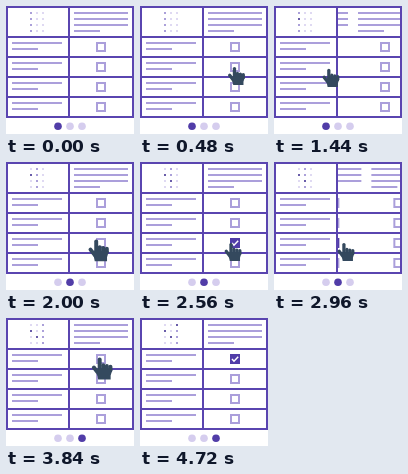
An HTML page with a canvas for the animation above (5.2 s loop, 128 by 128 pixels).

```html
<!DOCTYPE html>
<html lang="en">
<head>
<meta charset="utf-8">
<title>Swipe survey</title>
<style>
html, body { margin: 0; width: 100%; height: 100%; overflow: hidden; background: #fff; }
canvas { display: block; width: 128px; height: 128px; }
</style>
</head>
<body>
<canvas id="stage"></canvas>
<script>
const LOOP = 5200, STEP = 80, PITCH = 64;
const TRAVEL = 400, PRESS = 80, TICK = 160, HOLD = 200, SWIPE = 440;
const BORDER = '#5a45b0', ACTIVE = '#513da8', MEDIUM = '#8f80cc', LIGHT = '#ab9fdb';
const PALE = '#d5cdee', CHOSEN = '#38278c', SLATE = '#34495e';
const canvas = document.getElementById('stage');
const ctx = canvas.getContext('2d');
const ratio = window.devicePixelRatio || 1;
canvas.width = canvas.height = 128 * ratio;

const clamp = v => Math.min(1, Math.max(0, v));
const linear = p => p;
const easeIn = p => p * p;
const easeOut = p => 1 - (1 - p) * (1 - p);
const smooth = p => p * p * (3 - 2 * p);

// One visit per page: the hand ticks a row, then swipes the page (or leaves) to x, y.
const visits = [
  { row: 1, arrive: 400, swipe: 1220, x: 54, y: 72, ease: easeIn },
  { row: 2, arrive: 2120, swipe: 2818, x: 63, y: 90, ease: easeIn },
  { row: 0, arrive: 3880, leave: 4720, x: 141, y: 60, ease: smooth }
];
const swipes = visits.filter(v => v.swipe).map(v => v.swipe);

// Hand poses are [centre x, centre y, scale]; a pressed hand is smaller.
const ENTRY = [148, 122, 1], PRESSED = .82;
const moves = visits.flatMap(({ row, arrive, swipe, leave, x, y, ease }) => {
  const spot = [96.5, 50 + 20 * row];
  return [
    { start: arrive - TRAVEL, end: arrive, to: [...spot, 1], ease: easeOut },
    { start: arrive, end: arrive + PRESS, to: [...spot, PRESSED], ease: linear },
    { start: arrive + HOLD, end: leave || swipe + 250, to: [x, y, leave ? 1 : PRESSED], ease }
  ];
});

const progress = (t, start, end) => clamp((t - start) / (end - start));
const ticked = (page, row, t) => visits[page].row === row && t >= visits[page].arrive + TICK;

function rect(x, y, w, h, color) {
  ctx.fillStyle = color;
  ctx.fillRect(x, y, w, h);
}

function disc(x, y, r, color) {
  ctx.fillStyle = color;
  ctx.beginPath();
  ctx.arc(x, y, r, 0, Math.PI * 2);
  ctx.fill();
}

function trace(...points) {
  ctx.beginPath();
  for (const [x, y] of points) ctx.lineTo(x, y);
}

function drawCheckbox(x, y, checked) {
  if (!checked) {
    ctx.strokeStyle = LIGHT;
    ctx.lineWidth = 2;
    ctx.strokeRect(x - 4, y - 4, 8, 8);
    return;
  }
  rect(x - 5, y - 5, 10, 10, ACTIVE);
  ctx.strokeStyle = '#fff';
  ctx.lineWidth = 1.5;
  trace([x - 3, y], [x - 1, y + 2.2], [x + 3.2, y - 2.2]);
  ctx.stroke();
}

function drawPage(page, left, t) {
  for (let i = 0; i < 4; i++) {
    rect(left + 4, 6 + 6 * i, i < 3 ? 54 : 26, 2, LIGHT);
    drawCheckbox(left + 31, 41 + 20 * i, ticked(page, i, t));
  }
}

function drawTable() {
  for (let i = 0; i < 4; i++) {
    rect(6, 36 + 20 * i, 50, 2, LIGHT);
    rect(6, 42 + 20 * i, 26, 2, LIGHT);
  }
  for (const y of [0, 30, 50, 70, 90, 110]) rect(0, y, 128, 2, BORDER);
  for (const x of [0, 62, 126]) rect(x, 0, 2, 112, BORDER);
}

function drawDots(current, t) {
  visits.forEach((_, page) => {
    const active = page === current;
    for (let i = 0; i < 4; i++) {
      const color = ticked(page, i, t) ? CHOSEN : active ? MEDIUM : PALE;
      disc(25 + 6 * page, 7 + 6 * i, 1, color);
    }
    disc(52 + 12 * page, 120.3, 3.8, active ? ACTIVE : PALE);
  });
}

function drawHand(t) {
  const [x, y, scale] = moves.reduce((pose, { start, end, to, ease }) => {
    const p = ease(progress(t, start, end));
    return pose.map((v, i) => v + (to[i] - v) * p);
  }, ENTRY);

  ctx.save();
  ctx.translate(x, y);
  ctx.scale(scale, scale);
  ctx.fillStyle = ctx.strokeStyle = SLATE;
  ctx.lineWidth = 4;
  ctx.lineCap = 'round';
  for (let i = 0; i < 4; i++) {
    const fx = -2.5 + 3.6 * i;
    trace([fx, i ? -4 + .8 * i : -9], [fx, 2]);
    ctx.stroke();
  }
  trace([-8.3, -.8], [-3, 6]);
  ctx.stroke();
  trace([-4.5, 0], [10.3, 1], [8.5, 7], [8.5, 11], [-4, 11], [-5, 6]);
  ctx.fill();
  ctx.restore();
}

function draw(t) {
  ctx.setTransform(ratio, 0, 0, ratio, 0, 0);
  rect(0, 0, 128, 128, '#fff');
  const scroll = swipes.reduce((sum, at) => sum + easeOut(progress(t, at, at + SWIPE)), 0);
  const current = swipes.filter(at => t >= at + SWIPE).length;

  ctx.save();
  ctx.beginPath();
  ctx.rect(64, 2, 62, 108);
  ctx.clip();
  visits.forEach((_, page) => drawPage(page, 64 + (page - scroll) * PITCH, t));
  ctx.restore();

  drawTable();
  drawDots(current, t);
  drawHand(t);
}

const origin = performance.now();
function frame() {
  const t = (performance.now() - origin) % LOOP;
  draw(Math.floor(t / STEP) * STEP);
  requestAnimationFrame(frame);
}
frame();
</script>
</body>
</html>
```
